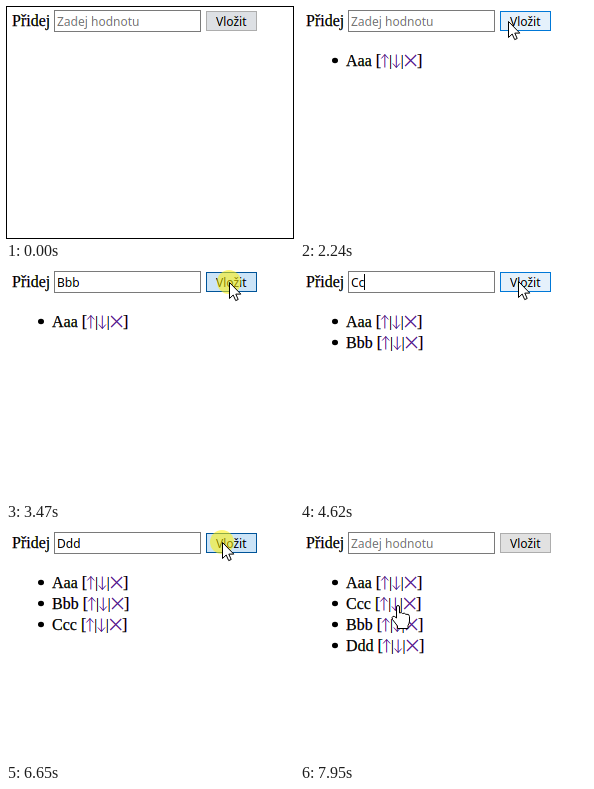
Write an HTML page with a canvas that moves like this. It is 288 px wide and 233 px high and loops after 8000 ms.

```html
<!DOCTYPE html>
<html lang="cs">
<head>
<meta charset="utf-8">
<title>Seznam</title>
<style>
html, body { margin: 0; width: 100%; height: 100%; overflow: hidden; background: #fff; }
canvas { display: block; }
</style>
</head>
<body>
<canvas id="stage" width="288" height="233"></canvas>
<script>
const ctx = document.getElementById('stage').getContext('2d');
const LOOP = 8000, KEY = 240, PRESS = 150, MOVE = 240, LINE = 21;
const SERIF = '16px "Liberation Serif", serif';
const SANS = '12px "Noto Sans", sans-serif';
const LINK = [85, 26, 139], BLACK = [0, 0, 0], HINT = [117, 117, 117];
const FIELD = { x: 48, y: 4, w: 147, h: 22 };
const BUTTON = { x: 200, y: 5, w: 51, h: 20 };
const SWAP = { press: 7870, release: 7950, x: 98, y: 77 };

// One round: focus the field, type a word, move to the button, press it.
const rounds = [
  { word: 'Aaa', type: 920, leave: 1400, press: 1920, x: 213, y: 15 },
  { word: 'Bbb', type: 2760, leave: 2990, press: 3470, x: 223, y: 15 },
  { word: 'Ccc', type: 4300, leave: 4030, press: 5010, x: 218, y: 14 },
  { word: 'Ddd', type: 5960, leave: 5720, press: 6650, x: 216, y: 14 }
];
for (const r of rounds) {
  r.focus = r.type - 300;
  r.release = r.press + PRESS;
}

const moves = rounds.flatMap((r, i) => [
  i ? { at: r.focus - 260, x: 150, y: 14 } : { at: 600, dur: 90, x: 153, y: 14 },
  { at: r.leave, x: r.x, y: r.y }
]);
moves.push({ at: 6950, dur: 600, x: SWAP.x, y: SWAP.y });

const within = (t, a, b) => t >= a && t < b;
const inside = (p, b) => p.x >= b.x && p.x < b.x + b.w && p.y >= b.y && p.y < b.y + b.h;
const clamp = v => Math.min(1, Math.max(0, v));
const smooth = u => u * u * (3 - 2 * u);

function pointerAt(t) {
  let x = 153, y = -9;
  for (const m of moves) {
    const p = smooth(clamp((t - m.at) / (m.dur || MOVE)));
    x += (m.x - x) * p;
    y += (m.y - y) * p;
  }
  return { x: Math.round(x), y: Math.round(y) };
}

function isPressed(t) {
  return within(t, SWAP.press, SWAP.release) || rounds.some((r, i) =>
    within(t, r.press, r.release) || (i > 0 && within(t, r.focus, r.focus + 80)));
}

// Paints each colour channel a third of a pixel apart, like LCD text.
function fringed(rgb, paint) {
  ctx.save();
  ctx.globalCompositeOperation = 'multiply';
  rgb.forEach((value, i) => {
    const ink = [255, 255, 255];
    ink[i] = value;
    ctx.fillStyle = ctx.strokeStyle = `rgb(${ink})`;
    ctx.save();
    ctx.translate((1 - i) / 3, 0);
    paint();
    ctx.restore();
  });
  ctx.restore();
}

function write(text, x, y, font, rgb = BLACK) {
  ctx.font = font;
  fringed(rgb, () => {
    ctx.fillText(text, x, y);
    if (font === SERIF) {
      ctx.lineWidth = 0.25;
      ctx.strokeText(text, x, y);
    }
  });
  return ctx.measureText(text).width;
}

function lines(width, ...paths) {
  ctx.lineWidth = width;
  ctx.beginPath();
  for (const path of paths) path.forEach(([x, y], i) => i ? ctx.lineTo(x, y) : ctx.moveTo(x, y));
  ctx.stroke();
}

function frame({ x, y, w, h }, fill, border) {
  ctx.fillStyle = border;
  ctx.fillRect(x, y, w, h);
  ctx.fillStyle = fill;
  ctx.fillRect(x + 1, y + 1, w - 2, h - 2);
}

function drawField(t, hover) {
  frame(FIELD, '#fff', hover ? '#171717' : '#7a7a7a');
  const round = rounds.find(r => t < r.release);
  const count = round ? Math.max(0, Math.min(3, Math.floor((t - round.type) / KEY) + 1)) : 0;
  const text = count ? round.word.slice(0, count) : '';
  const width = write(text || 'Zadej hodnotu', 51, 20, SANS, text ? BLACK : HINT);
  if (!round || !within(t, round.focus, round.press)) return;
  const lastKey = count ? round.type + (count - 1) * KEY : round.focus;
  if ((t - lastKey) % 1000 < 500) {
    ctx.fillStyle = '#000';
    ctx.fillRect(Math.round(51 + (text ? width : 0)), 7, 1, 16);
  }
}

function drawButton(t, hover, pressed) {
  const focused = rounds.some((r, i) =>
    within(t, r.press, i < 3 ? rounds[i + 1].focus : SWAP.press));
  if (hover && pressed) frame(BUTTON, '#cce4f7', '#005499');
  else if (hover) frame(BUTTON, '#e5f1fb', '#0078d7');
  else frame(BUTTON, t < 70 ? '#dde0e4' : '#e1e1e1', focused ? '#0078d7' : '#adadad');
  write('Vložit', 210, 20, SANS);
}

function arrowLink(x, y, dir) {
  const tip = y + 6.5 * dir, barb = tip - 4 * dir;
  lines(1, [[x, y - 6.5 * dir], [x, tip]], [[x - 3.5, barb], [x, tip], [x + 3.5, barb]]);
}

function drawItem(name, y) {
  ctx.fillStyle = '#000';
  ctx.beginPath();
  ctx.ellipse(35, y - 5.5, 3, 2.7, 0, 0, 7);
  ctx.fill();
  const x = 46 + write(name + ' [', 46, y, SERIF);
  fringed(LINK, () => {
    arrowLink(x + 3.7, y - 5, -1);
    arrowLink(x + 15.2, y - 5, 1);
    lines(1.2, [[x + 24, y - 11], [x + 35, y]], [[x + 35, y - 11], [x + 24, y]]);
  });
  fringed(BLACK, () => {
    for (const bar of [x + 9.5, x + 21.1]) lines(0.9, [[bar, y - 11], [bar, y + 3]]);
  });
  write(']', Math.round(x + 36), y, SERIF);
}

function drawList(t) {
  const names = rounds.filter(r => t >= r.release).map(r => r.word);
  if (t >= SWAP.release) [names[1], names[2]] = [names[2], names[1]];
  names.forEach((name, i) => drawItem(name, 60 + LINE * i));
}

const arrow = new Path2D('M.5 .5V16.5L4.2 13L6.7 18.6L9.2 17.5L6.8 12.1H11.8Z');
const hand = new Path2D('M-1.5 13V2Q-1.5 .5 0 .5T1.5 2V8Q3.5 6.8 4.5 8.5Q6.5 7.5 7.8 9.3' +
  'Q11.5 8.5 11.5 11.5V16Q11.5 18 10 20.5V23.5H-.5V21L-5.5 14.5Q-6.5 12-5 11.3Q-3.5 11-1.5 13Z');

function drawShape(path, p) {
  ctx.save();
  ctx.translate(p.x, p.y);
  ctx.fillStyle = '#fff';
  ctx.lineWidth = 1;
  ctx.fill(path);
  ctx.stroke(path);
  ctx.restore();
}

function drawPointer(p, overField) {
  ctx.strokeStyle = '#000';
  if (overField || p.y < FIELD.y) {
    const x = p.x + 0.5, serif = y => [[x - 3, y], [x + 3, y]];
    lines(1, [[x, p.y - 7], [x, p.y + 7]], serif(p.y - 7.5), serif(p.y + 7.5));
  } else {
    drawShape(inside(p, { x: 81, y: 68, w: 36, h: 18 }) ? hand : arrow, p);
  }
}

function draw(t) {
  ctx.fillStyle = '#fff';
  ctx.fillRect(0, 0, 288, 233);
  const p = pointerAt(t);
  const overField = inside(p, FIELD);
  const pressed = isPressed(t);
  write('Přidej', 6, 20, SERIF);
  drawField(t, overField);
  drawButton(t, inside(p, BUTTON), pressed);
  drawList(t);
  if (pressed) {
    ctx.fillStyle = 'rgba(255,240,0,.55)';
    ctx.beginPath();
    ctx.arc(p.x, p.y, 12, 0, 7);
    ctx.fill();
  }
  drawPointer(p, overField);
  if (t < 70) {
    ctx.lineWidth = 1;
    ctx.strokeRect(0.5, 0.5, 287, 232);
  }
}

function loop() {
  draw(performance.now() % LOOP);
  requestAnimationFrame(loop);
}
loop();
</script>
</body>
</html>
```
